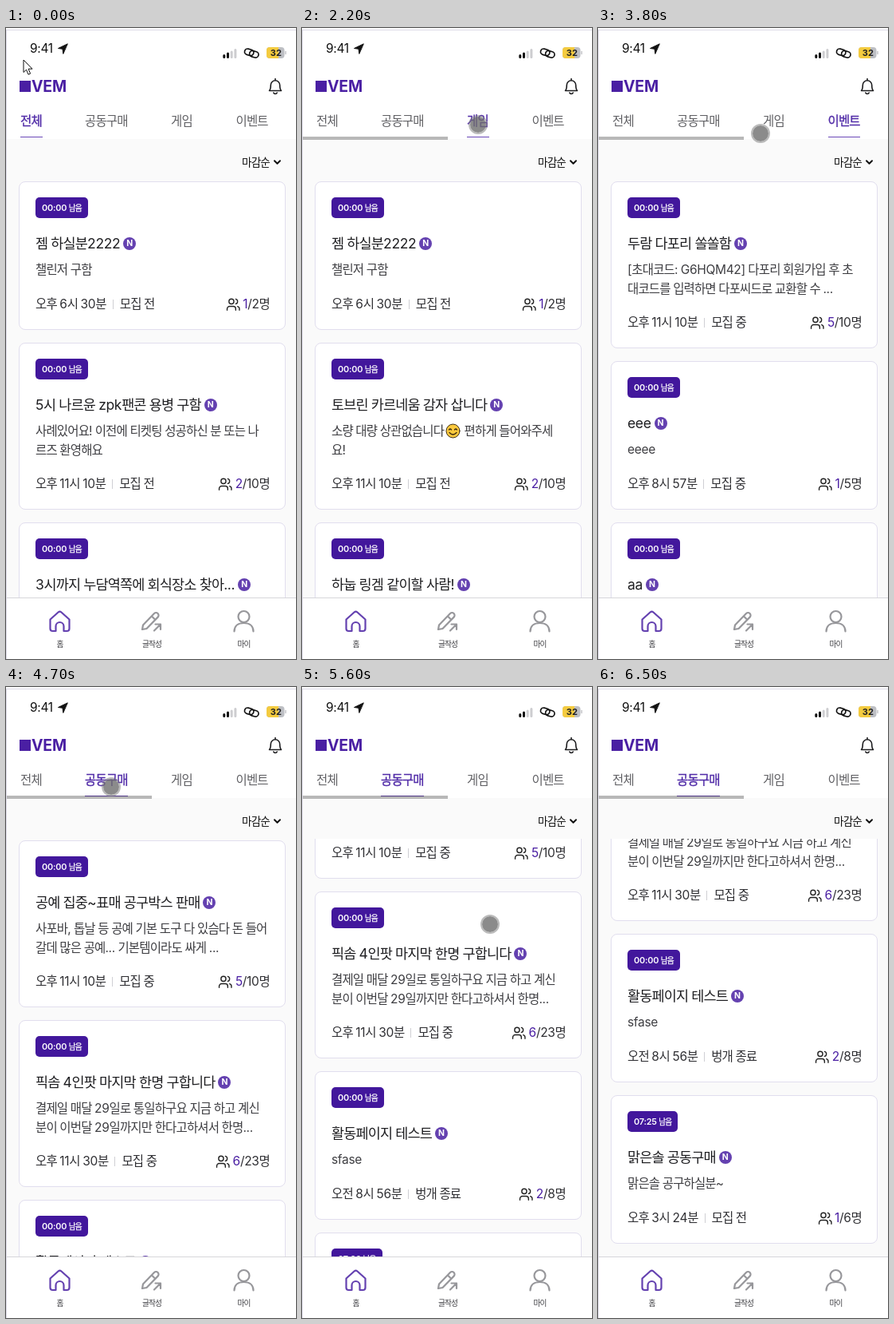
Animation, 364 px wide and 790 px high, one loop 6600 ms. Source, as an HTML page:

```html
<!DOCTYPE html>
<html lang="ko">
<head>
<meta charset="utf-8">
<title>모임 목록</title>
<style>
  html, body { margin: 0; width: 100%; height: 100%; overflow: hidden; background: #fff; }
  #stage {
    position: relative; width: 364px; height: 790px; overflow: hidden; background: #fafafa;
    font: 400 15.5px/24px Inter, "Noto Sans CJK KR", sans-serif;
    letter-spacing: -.055em; color: #303034; white-space: nowrap;
  }
  #stage div, #stage > svg { position: absolute; }
  i { font-style: normal; letter-spacing: -.02em; }
  #head { left: 0; top: 0; width: 364px; height: 139px; background: #fff; }
  #edge { left: 0; top: 2px; width: 364px; height: 788px; border: solid #dcdae6; border-width: 1px 0 0 1px; box-sizing: border-box; }
  .tab { top: 105px; color: #606064; }
  .tab.on { color: #522da8; -webkit-text-stroke: .35px #522da8; }
  #line { top: 136px; height: 1px; background: #6a48b8; }
  #bar { left: 1px; top: 136px; width: 182px; height: 4px; background: rgba(0,0,0,.28); }
  #sort { left: 296px; top: 156px; font-size: 13.6px; color: #111; }
  #view { left: 0; top: 190px; width: 364px; height: 523px; overflow: hidden; }
  #list { left: 0; width: 364px; }
  .card { left: 16px; width: 335px; box-sizing: border-box; border: 1px solid #e1deee; border-radius: 8px; background: #fff; }
  .card div { left: 20px; }
  .card .badge {
    top: 19px; height: 26px; line-height: 26px; padding: 0 8px; border-radius: 5px;
    background: #42179c; color: #fff; font-size: 10.9px; font-weight: 600;
  }
  .badge small { font-size: 9.7px; margin-left: 2.5px; font-weight: 400; -webkit-text-stroke: .25px #fff; }
  .card .title { top: 65px; display: flex; align-items: center; font-size: 17.5px; color: #1f1f22; }
  .title b {
    width: 16px; height: 16px; margin-left: 4px; border-radius: 50%; background: #6441b0; color: #fff;
    font-size: 10.5px; line-height: 16px; text-align: center; letter-spacing: 0;
  }
  .card .body { top: 98px; line-height: 23.5px; color: #3e3e42; }
  .card .meta { bottom: 19px; }
  .meta u { display: inline-block; width: 1px; height: 12px; margin: 0 8px; background: #cfcfd4; vertical-align: -1px; }
  .card .count { left: auto; right: 19px; bottom: 19px; display: flex; align-items: center; }
  .count svg { margin-right: 3px; }
  .count em { font-style: normal; color: #4a1fa3; }
  .face { vertical-align: -4px; margin: 0 1px 0 2px; }
  #nav { left: 0; top: 713px; width: 364px; height: 77px; background: #fff; border-top: 1px solid #d6d6da; box-sizing: border-box; }
  #nav div { top: 46px; width: 60px; text-align: center; font-size: 9.7px; color: #3c3c40; }
  #time { left: 30px; top: 14px; color: #111; }
  #name { left: 32px; top: 61px; font-size: 19.5px; font-weight: 700; color: #4a1fa3; letter-spacing: -.01em; }
  #touch {
    width: 20px; height: 20px; margin: -12px 0 0 -12px; border-radius: 50%;
    background: rgba(110,110,110,.8); background-clip: padding-box; border: 2px solid rgba(120,120,120,.5);
  }
</style>
</head>
<body>
<div id="stage">
  <div id="view"><div id="list"></div></div>
  <div id="sort">마감순</div>
  <div id="head">
    <div id="time"><i>9:41</i></div>
    <div id="name">VEM</div>
    <div id="tabs"></div>
    <div id="line"></div>
    <div id="bar"></div>
  </div>
  <div id="nav">
    <div style="left:37.5px">홈</div>
    <div style="left:153px">글작성</div>
    <div style="left:268.5px">마이</div>
  </div>
  <div id="edge"></div>
  <svg width="364" height="790" fill="none" stroke-linecap="round" stroke-linejoin="round">
    <path d="M77 20 65.500 25.500 71 26.300 71.800 32z" fill="#111" stroke="#111"/>
    <path d="M273.800 36.500v-2M278.500 36.500v-4.500" stroke="#111" stroke-width="3"/>
    <path d="M283.200 36.500v-6.500M287.900 36.500v-9" stroke="#cdcdd0" stroke-width="3"/>
    <g stroke="#111" stroke-width="1.700">
      <rect x="299.500" y="26.500" width="11.500" height="7.500" rx="3.700" transform="rotate(15 305 30)"/>
      <rect x="305.500" y="29" width="11.500" height="7.500" rx="3.700" transform="rotate(15 311 33)"/>
    </g>
    <rect x="327" y="24" width="22.500" height="14" rx="4" fill="#bdbfc4"/>
    <path d="M342 24h-11a4 4 0 0 0-4 4v6a4 4 0 0 0 4 4h11z" fill="#f4cb3f"/>
    <path d="M351 29.500v3" stroke="#c4c5c9" stroke-width="1.500"/>
    <text x="338.800" y="35" text-anchor="middle" font-family="Inter, sans-serif" font-size="11" font-weight="700" letter-spacing="0" fill="#222">32</text>
    <rect x="17" y="66" width="14" height="14" fill="#4a1fa3"/>
    <path d="M330.500 78.500c1.700-1.800 1.800-3.500 1.800-7a5.700 5.700 0 0 1 11.400 0c0 3.500.1 5.200 1.800 7zM338 65.500v-2M335.800 81a2.300 2 0 0 0 4.400 0" stroke="#1c1c1e" stroke-width="1.600"/>
    <path d="M337 166.200l3.500 3.600 3.500-3.600" stroke="#111" stroke-width="2"/>
    <path d="M55.500 740.500 65.500 731.500q2-1.700 4 0L79.500 740.500V752q0 3-3 3H72.500V749a5 5 0 0 0-10 0V755H58.500q-3 0-3-3z" stroke="#6441b0" stroke-width="2.200"/>
    <g stroke="#97979b" stroke-width="2.200">
      <path d="M171 753l1-5.500 14-14.500a3.200 3.200 0 0 1 4.600 4.600L176.500 752zM183 736.500l4.500 4.500"/>
      <path d="M186 754.500l8-8M187.500 746.500h6.500v6.500"/>
      <circle cx="298.500" cy="737" r="7"/>
      <path d="M286.500 755.500c0-7 5-10.500 12-10.500s12 3.500 12 10.500"/>
    </g>
  </svg>
  <div id="touch"></div>
  <svg id="arrow" width="14" height="21"><path d="M1 1v15.500l3.500-3.300 2.500 6 2.600-1.100-2.500-5.900H12z" fill="#fff" stroke="#111"/></svg>
</div>
<script>
const $ = id => document.getElementById(id);
const LOOP = 6600, STEP = 100;

// name, left, underline width
const tabs = [['전체', 18, 28], ['공동구매', 99, 54], ['게임', 207, 28], ['이벤트', 288.500, 40.500]];

// title, body lines, time, state, joined, limit
const lead = ['젬 하실분2222', ['챌린저 구함'], '오후 6시 30분', '모집 전', 1, 2];
const posts = [
  [
    lead,
    ['5시 나르윤 zpk팬콘 용병 구함', ['사례있어요! 이전에 티켓팅 성공하신 분 또는 나', '르즈 환영해요'], '오후 11시 10분', '모집 전', 2, 10],
    ['3시까지 누담역쪽에 회식장소 찾아...', ['같이 찾아요'], '오후 3시 10분', '모집 전', 1, 4]
  ],
  [
    ['공예 집중~표매 공구박스 판매', ['사포바, 톱날 등 공예 기본 도구 다 있슴다 돈 들어', '갈데 많은 공예... 기본템이라도 싸게 ...'], '오후 11시 10분', '모집 중', 5, 10],
    ['픽솜 4인팟 마지막 한명 구합니다', ['결제일 매달 29일로 통일하구요 지금 하고 계신', '분이 이번달 29일까지만 한다고하셔서 한명...'], '오후 11시 30분', '모집 중', 6, 23],
    ['활동페이지 테스트', ['sfase'], '오전 8시 56분', '벙개 종료', 2, 8],
    ['맑은솔 공동구매', ['맑은솔 공구하실분~'], '오후 3시 24분', '모집 전', 1, 6]
  ],
  [
    lead,
    ['토브린 카르네움 감자 삽니다', ['소량 대량 상관없습니다☺ 편하게 들어와주세', '요!'], '오후 11시 10분', '모집 전', 2, 10],
    ['하눕 링겜 같이할 사람!', ['같이해요'], '오후 9시 10분', '모집 전', 1, 3]
  ],
  [
    ['두람 다포리 쏠쏠함', ['[초대코드: G6HQM42] 다포리 회원가입 후 초', '대코드를 입력하면 다포씨드로 교환할 수 ...'], '오후 11시 10분', '모집 중', 5, 10],
    ['eee', ['eeee'], '오후 8시 57분', '모집 중', 1, 5],
    ['aa', ['aaa'], '오후 8시 50분', '모집 중', 1, 5]
  ]
];

const face = `<svg class="face" width="19" height="19" fill="none" stroke="#3a2a10" stroke-linecap="round">
  <circle cx="9.500" cy="9.500" r="8.500" fill="#fbc93d"/>
  <path d="M4.500 8q1.500-2 3 0M11.500 8q1.500-2 3 0M5 11.500q4.500 5 9 0" stroke-width="1.300"/></svg>`;
const people = `<svg width="18.500" height="18.500" viewBox="0 0 24 24" fill="none" stroke="#222" stroke-width="1.800" stroke-linecap="round">
  <path d="M16 21v-2a4 4 0 0 0-4-4H6a4 4 0 0 0-4 4v2M22 21v-2a4 4 0 0 0-3-3.870M16 3.130a4 4 0 0 1 0 7.750"/><circle cx="9" cy="7" r="4"/></svg>`;

// Latin runs get looser spacing than Hangul
const mix = s => s.replace(/[!-~]+/g, '<i>$&</i>').replace('☺', face);

function cards(tab) {
  let y = 2.300;
  return posts[tab].map(([title, body, time, state, joined, limit]) => {
    const two = body.length > 1, top = Math.round(y);
    y += two ? 225 : 201.700;
    return `<div class="card" style="top:${top}px;height:${two ? 209 : 186}px">
      <div class="badge"><i class="clock">00:00</i><small>남음</small></div>
      <div class="title"><span>${mix(title)}</span><b>N</b></div>
      <div class="body">${body.map(mix).join('<br>')}</div>
      <div class="meta">${mix(time)}<u></u>${mix(state)}</div>
      <div class="count">${people}<span><i><em>${joined}</em>/${limit}</i>명</span></div>
    </div>`;
  }).join('');
}

$('tabs').innerHTML = tabs.map(([name, x]) => `<div class="tab" style="left:${x}px">${name}</div>`).join('');

const clamp = v => Math.min(1, Math.max(0, v));
const ease = v => v * v * (3 - 2 * v);

// time, x, y of the pointer
const path = [
  [0, 22, 40], [700, 36, 78], [1300, 316, 122], [1400, 274, 121], [1700, 56, 121], [1800, 56, 121],
  [2200, 221, 121], [2600, 228, 122], [3100, 260, 125], [3300, 308, 124], [3800, 204, 132],
  [4300, 130, 125], [4600, 130, 125], [5000, 140, 127], [5400, 234, 294], [5600, 236, 297], [6600, 236, 297]
];

function pointer(t) {
  const k = path.findIndex(p => p[0] > t);
  const [t0, x0, y0] = path[k - 1], [t1, x1, y1] = path[k];
  const v = ease((t - t0) / (t1 - t0));
  return [x0 + (x1 - x0) * v, y0 + (y1 - y0) * v];
}

const tabAt = t => t < 2200 ? 0 : t < 3300 ? 2 : t < 4700 ? 3 : 1;

let shown = -1;
function showTab(tab) {
  if (tab === shown) return;
  shown = tab;
  $('list').innerHTML = cards(tab);
  [...$('tabs').children].forEach((el, k) => el.classList.toggle('on', k === tab));
  $('line').style.left = tabs[tab][1] + 'px';
  $('line').style.width = tabs[tab][2] + 'px';
}

function place(el, x, y, visible) {
  el.style.left = x + 'px';
  el.style.top = y + 'px';
  el.style.display = visible ? 'block' : 'none';
}

function render(t) {
  const tab = tabAt(t);
  showTab(tab);
  $('bar').style.display = t >= 1900 ? 'block' : 'none';
  const scroll = tab === 1 ? 333 * ease(clamp((t - 5297) / 620)) : 0;
  $('list').style.top = -Math.round(scroll) + 'px';
  if (tab === 1) {
    const left = 451 - Math.floor(t / 1000);
    const two = n => String(n).padStart(2, '0');
    document.querySelectorAll('.clock')[3].textContent = two(Math.floor(left / 60)) + ':' + two(left % 60);
  }
  const [x, y] = pointer(t);
  place($('arrow'), x - 1, y - 1, y <= 50);
  place($('touch'), x, y, y > 50 && t < 6100);
}

const start = performance.now();
function tick() {
  const t = (performance.now() - start) % LOOP;
  render(Math.floor(t / STEP) * STEP);
  requestAnimationFrame(tick);
}
tick();
</script>
</body>
</html>
```
